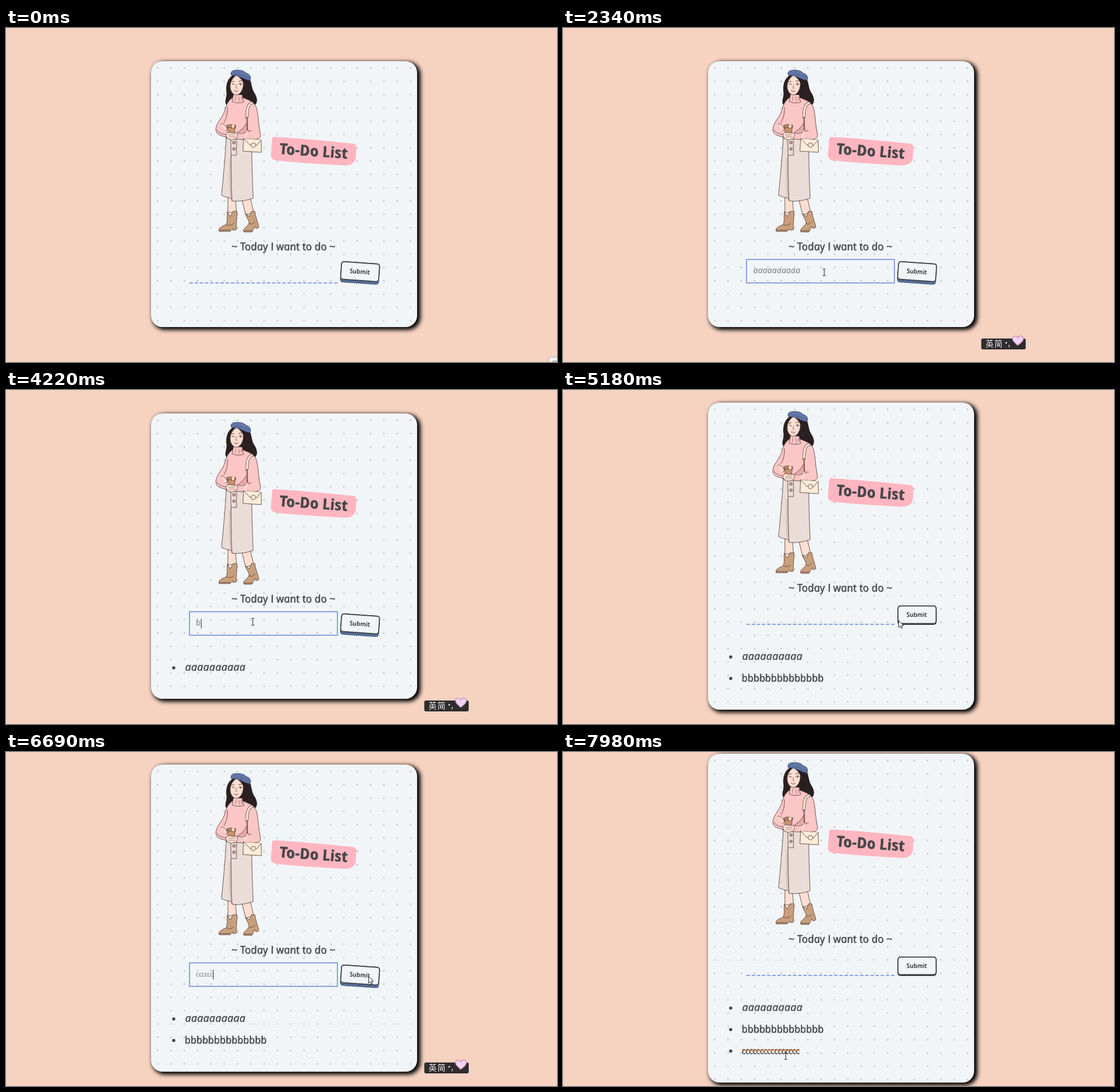
Write an HTML page with a canvas that moves like this. It is 961 by 583 pixels and loops after 8 s.

```html
<!DOCTYPE html>
<html lang="en">
<head>
<meta charset="utf-8">
<title>To-Do List</title>
<style>
html, body { margin: 0; width: 100%; height: 100%; overflow: hidden; background: #f6d2c0; }
canvas { display: block; }
</style>
</head>
<body>
<canvas id="stage" width="961" height="583"></canvas>
<script>
const ctx = document.getElementById('stage').getContext('2d');
const LOOP = 8000;
const INK = '#464749', PAPER = '#f1f5f8', BLUE = '#86a1e4', LINE = '#5d4540';
const SKIN = '#fddfd2', PINK = '#fcc6c6', BOOT = '#c99f7b', CREAM = '#fdecd9';

// Card top and height by number of tasks.
const TOPS = [58, 41, 22, 3];
const HEIGHTS = [464, 498, 536, 574];

// Each task: its letters, relative size, tracking in em, typing start, ms per key, submit time.
const TASKS = [
  { text: 'a'.repeat(10), scale: 1, track: .02, upright: false, type: 1340, step: 21, submit: 3270 },
  { text: 'b'.repeat(14), scale: 1, track: -.01, upright: true, type: 4210, step: 23, submit: 4940 },
  { text: 'c'.repeat(16), scale: .83, track: -.03, upright: true, type: 6570, step: 24, submit: 7260 }
];
const FOCUS = [[1050, 3170], [3930, 4840], [5700, 7160]];
const PRESSED = [[3160, 3930], [4830, 5700], [7150, 9000]];
const BADGE = [[40, 3170], [3930, 4840], [5700, 7160]];
const CLICKS = [[960, 1050], [3170, 3290], [3930, 3980], [4840, 4960],
                [5680, 5740], [7160, 7280], [7800, 7880]];
const STRIKE_AT = 7850;

// Pointer stops: time, x, y.
const POINTER = [
  [210, 966, 588], [700, 530, 402], [940, 442, 426], [1340, 442, 426], [1550, 455, 426],
  [2340, 455, 426], [2880, 610, 426], [3310, 610, 426], [3870, 430, 404], [4300, 430, 404],
  [4680, 622, 401], [5000, 622, 401], [5600, 454, 405], [5750, 454, 405], [6410, 632, 391],
  [7300, 632, 391], [7760, 388, 530], [8000, 388, 530]
];

const findSpan = (spans, t) => spans.find(([a, b]) => t >= a && t < b);
const clamp = v => Math.max(0, Math.min(1, v));
const smooth = v => v * v * (3 - 2 * v);

function path(d, fill, stroke = LINE, width = .9) {
  const p = new Path2D(d);
  if (fill) { ctx.fillStyle = fill; ctx.fill(p); }
  if (stroke) { ctx.strokeStyle = stroke; ctx.lineWidth = width; ctx.stroke(p); }
}

function disc(x, y, r, fill, stroke) {
  ctx.beginPath();
  ctx.arc(x, y, r, 0, 7);
  ctx.fillStyle = fill;
  ctx.fill();
  if (stroke) { ctx.strokeStyle = stroke; ctx.lineWidth = .9; ctx.stroke(); }
}

function fillRound(x, y, w, h, r, fill) {
  ctx.beginPath();
  ctx.roundRect(x, y, w, h, r);
  ctx.fillStyle = fill;
  ctx.fill();
}

// Italic letterforms, set upright again by shearing and thickened for a pen-like look.
function write(text, x, y, { size, weight = 400, pen = 0, align = 'left', color = INK, track = 0, upright = true }) {
  ctx.save();
  ctx.translate(x, y);
  if (upright) ctx.transform(1, 0, .2, 1, 0, 0);
  ctx.font = `italic ${weight} ${size}px "Open Sans", "Noto Sans", sans-serif`;
  ctx.letterSpacing = track * size + 'px';
  ctx.textAlign = align;
  ctx.fillStyle = ctx.strokeStyle = color;
  ctx.lineJoin = 'round';
  ctx.fillText(text, 0, 0);
  if (pen) { ctx.lineWidth = pen; ctx.strokeText(text, 0, 0); }
  const w = ctx.measureText(text).width;
  ctx.restore();
  return w;
}

function drawCard(top, height) {
  // Only the shadow of this far-off shape lands on the stage.
  const away = 2000;
  ctx.save();
  ctx.shadowColor = '#000';
  ctx.shadowBlur = 7;
  ctx.shadowOffsetX = away + 4;
  ctx.shadowOffsetY = 3;
  fillRound(251 - away, top - 2, 468, height + 4, 22, '#000');
  ctx.restore();

  fillRound(253, top, 464, height, 20, PAPER);
  for (let y = 12; y < height; y += 23.2)
    for (let x = 11.6; x < 464; x += 23.2) disc(253 + x, top + y, 1.4, '#bfc3ca');
}

function drawGirl() {
  ctx.lineJoin = ctx.lineCap = 'round';
  // hair
  path('M400 81C388 84 383 98 385 112C386 122 380 129 385 134C391 133 396 128 398 120L412 121C418 129 427 135 434 134C440 129 437 119 432 112C427 104 429 93 422 86Z', '#2a1f21', '#2a1f21');
  // legs
  path('M387 294L387 322L402 322L400 296Z', SKIN);
  path('M411 298L418 326L432 322L426 296Z', SKIN);
  // boots
  path('M386 321L391 329L396 320L403 320C403 332 401 342 402 352L396 353L395 350L391 355L372 355C369 349 377 346 384 343C387 336 385 328 386 321Z', BOOT);
  path('M418 324L425 329L428 320L434 320C435 330 440 340 441 348L436 350L434 346L429 356L415 356C412 350 421 347 424 341C424 334 418 330 418 324Z', BOOT);
  path('M385 343C390 346 394 344 397 341M372 353L391 353M424 341C429 344 432 341 434 338M415 354L429 354', null);
  // skirt
  path('M384 191C383 222 378 268 376 292Q384 296 393 297L395 302C408 303 420 301 431 297C430 268 428 230 429 193Z', '#eaddd8');
  path('M389 228C388 252 389 276 390 296L394 297L393 222Z', '#d7c8c2', null);
  path('M392 194C393 228 392 266 394 301M393 222L402 222L402 194', null);
  disc(397.5, 200, 2.3, '#c9aaa0', LINE);
  disc(397.5, 211, 2.3, '#c9aaa0', LINE);
  // sweater
  path('M396 121C387 126 383 137 381 146C376 158 366 167 366 177C366 186 374 188 383 190L386 193L404 194C414 195 428 195 437 194C444 193 445 189 443 181C440 167 440 150 437 140C434 129 424 126 414 122Z', PINK);
  path('M420 165C416 174 409 179 403 183L424 181Z', '#e6a7aa', null);
  path('M386 138C387 150 384 158 380 165M420 165C416 174 409 179 403 183M404 183C412 187 420 180 428 179M368 178C372 184 378 185 384 186', null);
  path('M397 116C395 121 396 126 394 128C401 132 410 131 415 129C412 125 413 121 412 117Z', PINK);
  path('M401 120L400 127M406 120L407 128M410 120L411 126', null, LINE, .6);
  // bag and strap
  path('M429 131C420 134 421 146 420 156', null, LINE, 5);
  path('M429 131C420 134 421 146 420 156', null, CREAM, 3.4);
  ctx.setLineDash([2.5, 2]);
  path('M420.5 156L421 180', null, '#7d6256', 2.4);
  ctx.setLineDash([]);
  path('M421 180L416 194', null, CREAM, 2);
  path('M415 193L445 195.5L445.5 217L413.5 215Z', CREAM);
  path('M415 193L425 204L437 205L445 195.5', CREAM);
  disc(431.5, 204.5, 4, CREAM, LINE);
  // cup and hands
  path('M386 172L400 172L398 187L389 187Z', '#c8926b');
  path('M385 170Q393 167 401 170L400 174L387 174Z', '#b98560');
  path('M394 169L398 168L398 174L394 174Z', '#f7e4d6', null);
  path('M375 167C379 166 384 172 386 176L383 180M384 190C381 184 389 180 393 183L402 183C406 187 403 193 398 194C393 197 387 194 384 190Z', SKIN);
  path('M388 187L400 186M389 190L400 190', null, LINE, .6);
  // face
  path('M402 82C395 87 391 94 391 102C391 111 397 117 402 117C409 116 414 107 414 97C413 91 408 87 402 82Z', SKIN);
  path('M394 98Q397 96 399 99M406 98Q409 95 412 98M394 94L398 93M406 93L411 92', null, '#3a2b2b', .9);
  disc(409, 98.8, 1.1, '#3a2b2b');
  path('M402 99L401 105L403 105', null, LINE, .7);
  path('M398 109Q402 111 405 109Q402 115 398 109', '#fff', '#a65050', .8);
  // beret
  path('M393 82C390 76 396 73 404 73.5C412 73.5 417 76 419 79C425 80 428 85 426 91C418 92 408 82 393 82Z', '#6276a6', '#414c74');
  path('M399 80C409 80 417 86 425 87', null, '#4b5887', .8);
}

function drawLabel() {
  path('M467 190C505 192 570 198 607 202Q612 204 611 212L610 228Q607 240 590 240C555 238 505 235 470 231Q462 229 462 222L464 196Q464 191 467 190Z', '#ffb6c1', null);
  ctx.save();
  ctx.translate(538, 215);
  ctx.rotate(4 * Math.PI / 180);
  write('To-Do List', 0, 9, { size: 26, weight: 700, pen: .5, align: 'center' });
  ctx.restore();
}

function drawInput(t) {
  const focused = findSpan(FOCUS, t);
  ctx.strokeStyle = BLUE;
  ctx.lineWidth = 2;
  ctx.lineCap = 'butt';
  if (focused) {
    ctx.strokeRect(320, 404, 258, 41);
  } else {
    ctx.setLineDash([6, 3]);
    ctx.beginPath();
    ctx.moveTo(320, 445);
    ctx.lineTo(578, 445);
    ctx.stroke();
    ctx.setLineDash([]);
  }
  const task = TASKS.find(k => t >= k.type && t < k.submit);
  let width = 0, blinkFrom = focused ? focused[0] : 0;
  if (task) {
    const n = Math.min(task.text.length, Math.floor((t - task.type) / task.step) + 1);
    width = write(task.text.slice(0, n), 332, 428, { ...task, size: 14 * task.scale, color: '#707275' });
    blinkFrom = Math.min(t, task.type + n * task.step);
  }
  if (focused && (t - blinkFrom) % 920 < 460) {
    ctx.fillStyle = '#333';
    ctx.fillRect(Math.round(332 + width), 416, 1, 17);
  }
}

function drawButton(t) {
  const span = findSpan(PRESSED, t);
  const back = PRESSED.find(s => t >= s[1] && t < s[1] + 100);
  const p = span ? clamp((t - span[0]) / 100) : back ? 1 - (t - back[1]) / 100 : 0;
  const top = -18 + 3 * p;
  ctx.save();
  ctx.translate(617.5, 427);
  ctx.rotate(4 * (1 - p) * Math.PI / 180);
  fillRound(-34, top, 68, 37 - 3 * p, 5, '#3f4144');
  ctx.save();
  ctx.clip();
  ctx.globalAlpha = 1 - p;
  ctx.strokeStyle = '#6d97e6';
  ctx.lineWidth = 1.5;
  ctx.beginPath();
  for (let x = -36; x < 38; x += 4) { ctx.moveTo(x, 19); ctx.lineTo(x + 7, 11); }
  ctx.stroke();
  ctx.restore();
  fillRound(-33.2, top + .8, 66.4, 30.8, 4.5, PAPER);
  ctx.strokeStyle = '#3f4144';
  ctx.lineWidth = 1.7;
  ctx.stroke();
  write('Submit', 0, top + 20, { size: 11, weight: 600, align: 'center', color: '#222' });
  ctx.restore();
}

function drawList(count, t) {
  for (let i = 0; i < count; i++) {
    const y = 502 + i * 37.5, task = TASKS[i];
    disc(292.5, y, 2.8, INK);
    const w = write(task.text, 312.5, y + 5, { ...task, size: 18 * task.scale, pen: .5 });
    if (i === 2 && t >= STRIKE_AT) {
      ctx.beginPath();
      for (let x = 0; x <= w; x++) ctx.lineTo(312.5 + x, y - 1 + 1.2 * Math.sin(x * .9));
      ctx.strokeStyle = '#e0853f';
      ctx.lineWidth = 1.4;
      ctx.stroke();
    }
  }
}

function drawBadge() {
  fillRound(729.5, 542, 77.5, 19, 3, '#2f2c2d');
  ctx.fillStyle = '#f4f2f2';
  ctx.font = '500 14px "Noto Sans CJK SC", "Noto Sans CJK", sans-serif';
  ctx.textAlign = 'left';
  ctx.fillText('英', 737, 556);
  ctx.fillText('简', 752.5, 556);
  ctx.fillText('·', 766, 554);
  ctx.fillText(',', 776, 555);
  path('M793 554C788 549 783 546 784 541C786 536 792 538 793 541C795 537 801 536 803 541C804 546 798 550 793 554Z', '#f0d3ef', '#c88abf', 1.2);
}

function drawPointer(t, top) {
  const i = POINTER.findIndex(k => k[0] > t);
  if (i < 1) return;
  const [t0, x0, y0] = POINTER[i - 1], [t1, x1, y1] = POINTER[i];
  const k = smooth((t - t0) / (t1 - t0));
  const x = x0 + (x1 - x0) * k, y = y0 + (y1 - y0) * k;
  if (findSpan(CLICKS, t)) {
    ctx.globalCompositeOperation = 'multiply';
    disc(x, y, 11, '#fcf86c');
    ctx.globalCompositeOperation = 'source-over';
  }
  const overInput = x > 319 && x < 578 && y > top + 345 && y < top + 389;
  const overItem = x > 312 && x < 418 && y > top + 505;
  ctx.save();
  ctx.translate(Math.round(x), Math.round(y));
  if (overInput || overItem) {
    path('M-2 -5.5L0 -5.5L.5 -5L1 -5.5L3 -5.5M.5 -5L.5 6M-2 6.5L0 6.5L.5 6L1 6.5L3 6.5', null, '#222', 1);
  } else {
    path('M.5 .5L.5 12.5L3.3 10L5.2 14L7 13.2L5.3 9.2L9 9Z', '#fff', '#222', 1);
  }
  ctx.restore();
}

function draw(t) {
  const count = TASKS.filter(k => t >= k.submit).length;
  const top = TOPS[count];
  ctx.fillStyle = '#f6d2c0';
  ctx.fillRect(0, 0, 961, 583);
  drawCard(top, HEIGHTS[count]);

  ctx.save();
  ctx.translate(0, top - TOPS[0]);
  drawGirl();
  drawLabel();
  write('~ Today I want to do ~', 485, 388, { size: 18.6, pen: .5, align: 'center' });
  drawInput(t);
  drawButton(t);
  drawList(count, t);
  ctx.restore();

  if (findSpan(BADGE, t)) drawBadge();
  if (t < 40) {
    path('M946.5 584L946.5 574.5L962 574.5L962 584Z', '#f4efeb', '#b9b3ae', 1);
    path('M953 581.5L961 581.5', null, '#777', 1);
  }
  drawPointer(t, top);
}

function tick() {
  draw(performance.now() % LOOP);
  requestAnimationFrame(tick);
}
tick();
</script>
</body>
</html>
```
